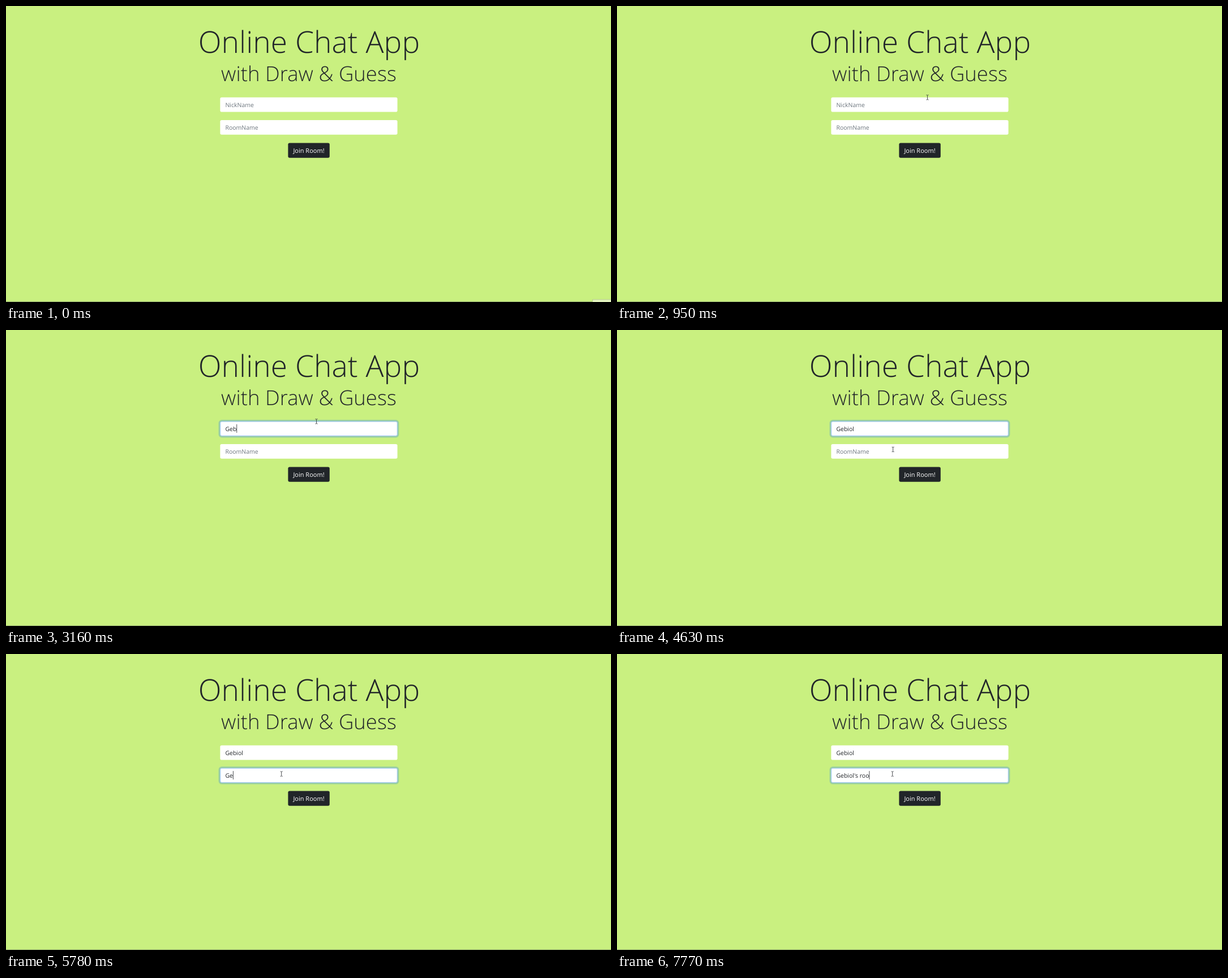
Write an HTML page that moves like this. It is 1069x524 px and loops after 8000 ms.

```html
<!DOCTYPE html>
<html lang="en">
<head>
<meta charset="utf-8">
<title>Online Chat App</title>
<style>
  html, body { margin: 0; width: 100%; height: 100%; overflow: hidden; background: #c9f080; }
  svg { display: block; width: 1069px; height: 524px; }
  text { font: 10.5px "Open Sans", "Noto Sans", sans-serif; fill: #212529; text-rendering: geometricPrecision; }
  .middle { text-anchor: middle; }
  .title { font-size: 53.4px; font-weight: 300; }
  .subtitle { font-size: 36.5px; font-weight: 300; }
  .button { font-size: 11px; fill: #fff; }
  .empty { fill: #6c757d; }
  .glow { fill: #0d6efd; fill-opacity: .25; }
  .edge { fill: #fff; stroke: #86b7fe; stroke-width: .7; }
</style>
</head>
<body>
<svg viewBox="0 0 1069 524">
  <rect y="523.2" width="1069" height=".8" fill="#84986a"/>
  <rect id="hint" x="1036.5" y="519.5" width="34" height="6" fill="#e2f3bd" stroke="#b9cf8d"/>
  <text class="middle title" x="535.5" y="82.6">Online Chat App</text>
  <text class="middle subtitle" x="535" y="133">with Draw &amp; Guess</text>
  <rect x="498.4" y="242.4" width="73.4" height="26.4" rx="2.8" fill="#212529"/>
  <text class="middle button" x="535" y="259.8">Join Room!</text>
  <g id="fields"></g>
  <path id="arrow" d="M0 0V11.5L2.7 9 4.5 13 6.2 12.2 4.5 8.4H8.1Z" fill="#fff" stroke="#222" stroke-width=".7"/>
  <path id="beam" d="M-2-4.2H-.6L0-3.6 .6-4.2H2M0-3.6V3.6M-2 4.2H-.6L0 3.6 .6 4.2H2" fill="none" stroke="#2b2f33" stroke-width=".85"/>
</svg>
<script>
const LOOP = 8000, BLINK = 530, KEY_PACE = 186, ENTER = 70, LEFT = 387.4;
const $ = id => document.getElementById(id);
const clamp = v => Math.max(0, Math.min(1, v));
const easeOut = (t, from, to, power) => 1 - (1 - clamp((t - from) / (to - from))) ** power;

// Each burst of typing has a start time and a steady pace.
const fields = [
  { top: 161.8, hint: "NickName", focus: 1090, blur: 4840,
    bursts: [["G", 2480], ["ebiol", 2890]] },
  { top: 202, hint: "RoomName", focus: 4840, blur: Infinity,
    bursts: [["Gebiol", 5440], ["'s\u00a0roo", 6840]] }
];

function add(parent, name, attrs) {
  const node = document.createElementNS("http://www.w3.org/2000/svg", name);
  for (const key in attrs) node.setAttribute(key, attrs[key]);
  return parent.appendChild(node);
}

function box(parent, top, grow, attrs) {
  return add(parent, "rect", { x: 378.4 - grow, y: top - grow, width: 313.2 + 2 * grow,
    height: 25.8 + 2 * grow, rx: 2.8 + grow, ...attrs });
}

for (const f of fields) {
  const group = $("fields");
  box(group, f.top, 0, { fill: "#fff" });
  f.ring = add(group, "g", {});
  box(f.ring, f.top, 2.8, { class: "glow" });
  box(f.ring, f.top, -.35, { class: "edge" });
  f.text = add(group, "text", { x: LEFT, y: f.top + 17.1 });
  f.caret = add(group, "rect", { y: f.top + 5.1, width: .8, height: 15, fill: "#212529" });
}

function drawField(f, t) {
  let typed = "", lastInput = f.focus;
  for (const [text, start] of f.bursts) {
    if (t < start) break;
    const count = Math.min(text.length, 1 + Math.floor((t - start) / KEY_PACE));
    typed += text.slice(0, count);
    lastInput = start + (count - 1) * KEY_PACE;
  }
  f.text.textContent = typed || f.hint;
  f.text.setAttribute("class", typed ? "" : "empty");

  const fade = start => clamp((t - start + 15) / 150);
  f.ring.setAttribute("opacity", fade(f.focus) - fade(f.blur));

  const lit = t >= f.focus && t < f.blur && Math.floor((t - lastInput) / BLINK) % 2 === 0;
  f.caret.setAttribute("opacity", lit ? 1 : 0);
  f.caret.setAttribute("x", LEFT + (typed ? f.text.getComputedTextLength() : 0));
}

// A curved sweep in from the corner, then a straight move to the second field.
function pointerAt(t) {
  const u = easeOut(t, ENTER, 950, 1.7), v = easeOut(t, 4150, 4700, 2);
  const bend = (a, b, c) => a * (1 - u) ** 2 + 2 * b * u * (1 - u) + c * u * u;
  return [bend(1045, 690, 548.5) - 61.8 * v, bend(520, 430, 161.8) + 50.4 * v];
}

function drawPointer(t) {
  const [x, y] = pointerAt(t);
  const overField = x < 692 && fields.some(f => y > f.top - 2 && y < f.top + 26);
  const shown = overField ? "beam" : "arrow";
  for (const id of ["arrow", "beam"]) {
    $(id).setAttribute("transform", `translate(${x} ${y})`);
    $(id).setAttribute("opacity", t >= ENTER && id === shown ? 1 : 0);
  }
}

function draw() {
  const t = performance.now() % LOOP;
  $("hint").setAttribute("opacity", t < ENTER ? 1 : 0);
  fields.forEach(f => drawField(f, t));
  drawPointer(t);
  requestAnimationFrame(draw);
}
draw();
</script>
</body>
</html>
```
